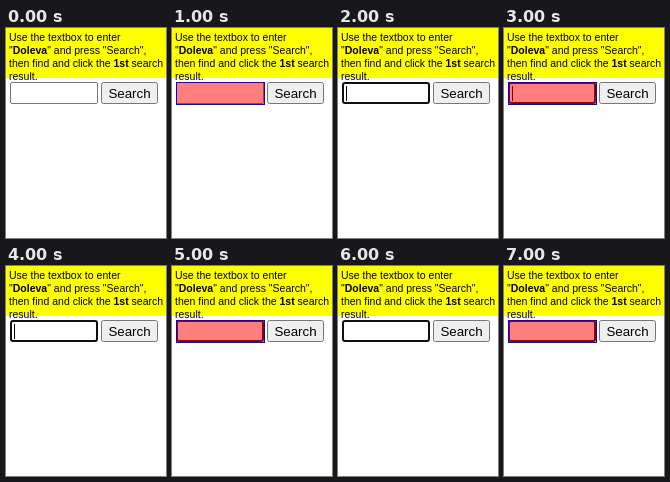
Animation of 160 by 210 pixels, one loop 8 s. Source, as an HTML page:

```html
<!DOCTYPE html>
<html lang="en">
<head>
<meta charset="utf-8">
<title>Search task</title>
<style>
  html, body { margin: 0; width: 100%; height: 100%; overflow: hidden; background: #fff; }
  body { position: relative; font-family: "Liberation Sans", Arial, sans-serif; color: #000; }
  body > * { position: absolute; box-sizing: border-box; margin: 0; pointer-events: none; }
  #query { left: 0; top: 0; width: 160px; height: 50px; padding: 3px; background: #ff0; font-size: 10.5px; line-height: 13px; white-space: nowrap; }
  #box, #button { top: 54px; height: 22px; }
  #box { left: 4px; width: 88px; }
  #box.focus { border: 2px solid #101010; border-radius: 3px; }
  #button { left: 95px; width: 57px; padding: 2px 0 1px; font: 13.333px/15px "Liberation Sans", Arial, sans-serif; }
  #caret { left: 8px; top: 58px; width: 1px; height: 15px; background: #000; }
  #highlight { left: 4px; top: 54px; width: 89px; height: 23px; border: 1px solid #00f; background: rgba(255, 0, 0, .5); background-clip: padding-box; }
</style>
</head>
<body>
<div id="query">Use the textbox to enter<br>"<b>Doleva</b>" and press "Search",<br>then find and click the <b>1st</b> search<br>result.</div>
<input id="box" readonly tabindex="-1">
<button id="button" tabindex="-1">Search</button>
<div id="caret"></div>
<div id="highlight"></div>
<script>
  const [box, caret, highlight] = ["box", "caret", "highlight"].map(id => document.getElementById(id));
  const start = performance.now();

  // The highlight blinks every second; focus arrives with the click at 2 s.
  function draw() {
    const second = Math.floor((performance.now() - start) / 1000) % 8;
    box.classList.toggle("focus", second >= 2);
    caret.hidden = second < 2 || second > 4;
    highlight.hidden = second % 2 === 0;
    requestAnimationFrame(draw);
  }
  draw();
</script>
</body>
</html>
```
